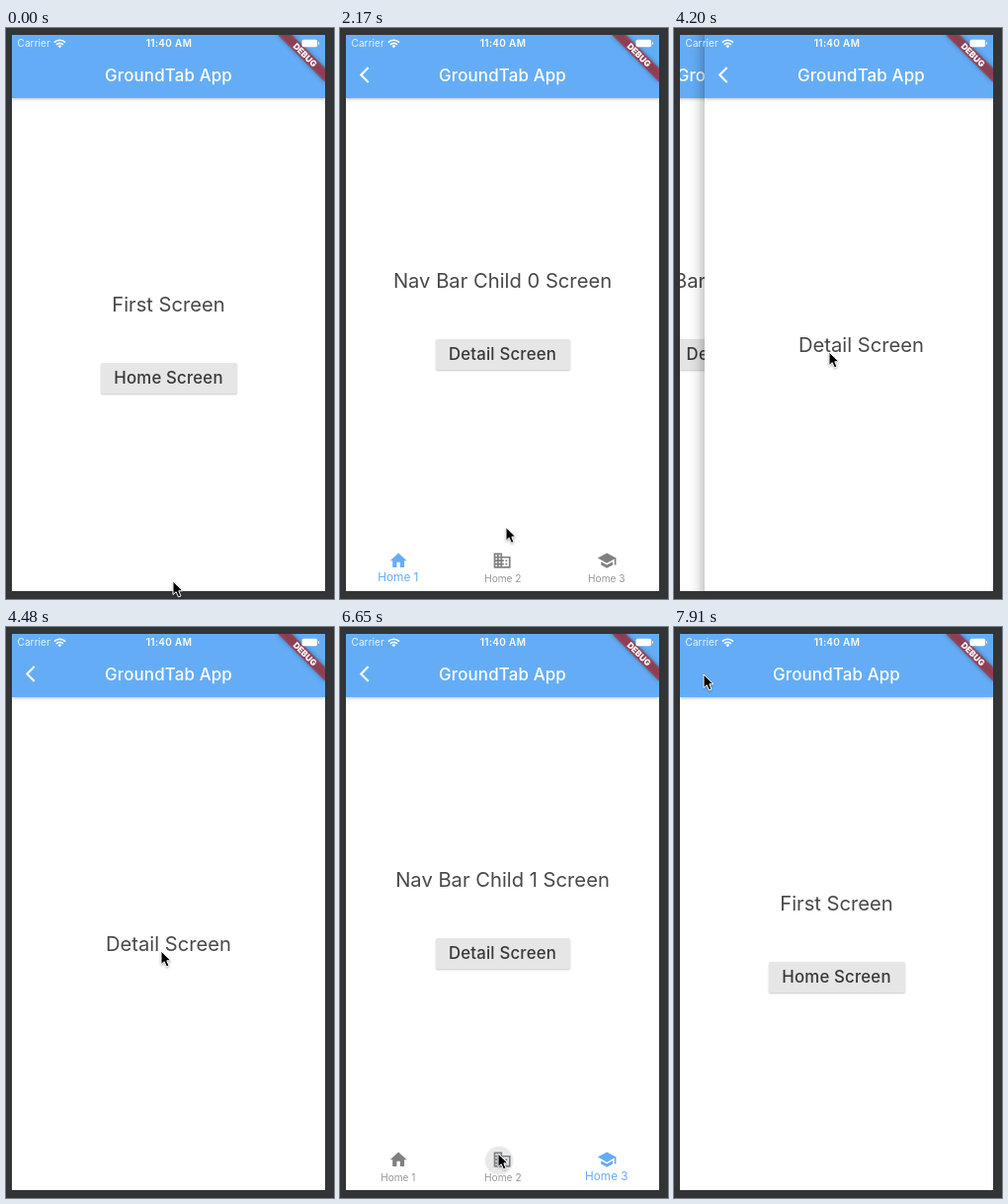
Recreate the animation shown at these times as an HTML page. Size 332 px wide and 578 px high, loop 8 s.

```html
<!DOCTYPE html>
<html lang="en">
<head>
<meta charset="utf-8">
<title>GroundTab App</title>
<style>
@property --on { syntax: "<number>"; inherits: true; initial-value: 0; }

html, body { margin: 0; width: 100%; height: 100%; overflow: hidden; background: #333435; }
body { position: relative; font-family: Inter, Roboto, sans-serif; }
.phone { position: absolute; left: 6px; top: 7px; width: 317px; height: 563px; overflow: hidden; background: #fff; }

/* Pages: 8 s loop, 1% = 80 ms */
.page { position: absolute; inset: 0; background: #fff; animation: 8s infinite cubic-bezier(.35, .91, .33, .97); }
.page::before { content: ""; position: absolute; left: -16px; width: 16px; top: 0; bottom: 0;
  background: linear-gradient(90deg, transparent, rgba(0, 0, 0, .05) 50%, rgba(0, 0, 0, .2)); }
.first { animation-name: first; }
.home { animation-name: home; }
.detail { animation-name: detail; }
@keyframes first {
  0%, 9.75% { transform: none; }
  14.875%, 92.875% { transform: translateX(-33.33%); }
  97.875%, 100% { transform: none; }
}
@keyframes home {
  0%, 9.75% { transform: translateX(100%); visibility: hidden; }
  14.875%, 50% { transform: translateX(0); visibility: visible; }
  55%, 63.625% { transform: translateX(-33.33%); visibility: visible; }
  68.625%, 92.875% { transform: translateX(0); visibility: visible; }
  97.875%, 100% { transform: translateX(100%); visibility: hidden; }
}
@keyframes detail {
  0%, 50% { transform: translateX(100%); visibility: hidden; }
  55%, 63.625% { transform: translateX(0); visibility: visible; }
  68.625%, 100% { transform: translateX(100%); visibility: hidden; }
}

.bar { position: absolute; left: 0; right: 0; top: 0; height: 64px; background: #64adf6; box-shadow: 0 1px 3px rgba(0, 0, 0, .25); }
.bar h1 { top: 30.5px; margin: 0; font-size: 16.9px; font-weight: 500; letter-spacing: .15px; color: #fff; }
.bar svg { position: absolute; left: 13px; top: 32px; }
.line { position: absolute; left: 0; right: 0; margin: 0; text-align: center; line-height: 20px; white-space: nowrap; }
.head { font-size: 20.2px; font-weight: 400; color: #484848; }
.btn { position: absolute; height: 31px; line-height: 30.5px; border-radius: 2px; text-align: center; white-space: nowrap;
  font-size: 16.8px; font-weight: 500; letter-spacing: .18px; color: #383838; background: #e6e6e6;
  box-shadow: 0 1px 2px rgba(0, 0, 0, .22); animation: 8s infinite ease-out; }
.first .btn { left: 89.5px; top: 332px; width: 138px; animation-name: press1; }
.home .btn { left: 90.5px; top: 308px; width: 136px; animation-name: press2; }
@keyframes press1 { 0%, 8.25% { background: #e6e6e6; } 9.75% { background: #d4d4d4; } 13%, 100% { background: #e6e6e6; } }
@keyframes press2 { 0%, 48.5% { background: #e6e6e6; } 50% { background: #d4d4d4; } 53.5%, 100% { background: #e6e6e6; } }

.child { top: 238.5px; animation: 8s infinite step-end; }
.c0 { animation-name: c0; }
.c1 { animation-name: c1; }
.c2 { animation-name: c2; }
@keyframes c0 { 0% { opacity: 1; } 30.625%, 100% { opacity: 0; } }
@keyframes c1 { 0% { opacity: 0; } 30.625% { opacity: 1; } 38.125% { opacity: 0; } 83%, 100% { opacity: 1; } }
@keyframes c2 { 0% { opacity: 0; } 38.125% { opacity: 1; } 83%, 100% { opacity: 0; } }

/* Tabs */
.nav { position: absolute; left: 0; right: 0; bottom: 0; height: 47px; overflow: hidden; }
.tab { position: absolute; top: 0; width: 33.333%; height: 100%; text-align: center;
  color: color-mix(in srgb, #64adf6 calc(var(--on) * 100%), #808080); animation: 8s infinite ease; }
.tab svg { position: absolute; left: calc(50% - 10.15px); top: 5.8px; width: 20.3px; height: 20.3px; fill: currentColor; }
.tab span { position: absolute; left: 0; right: 0; top: 26px; line-height: 14px; font-size: 11.8px;
  opacity: calc(.82 + .18 * var(--on));
  transform-origin: 50% 130%; transform: scale(calc(.857 + .143 * var(--on))); }
.t1 { left: 0; animation-name: t1; }
.t2 { left: 33.333%; animation-name: t2; }
.t3 { left: 66.667%; animation-name: t3; }
@keyframes t1 { 0%, 30.625% { --on: 1; } 33.125%, 100% { --on: 0; } }
@keyframes t2 { 0%, 30.625% { --on: 0; } 33.125%, 38.125% { --on: 1; } 40.625%, 83% { --on: 0; } 85.5%, 100% { --on: 1; } }
@keyframes t3 { 0%, 38.125% { --on: 0; } 40.625%, 83% { --on: 1; } 85.5%, 100% { --on: 0; } }

.ripple { position: absolute; left: var(--x); top: var(--y); width: 74px; height: 74px; margin: -37px; border-radius: 50%;
  background: #e9e9e9; animation: ripple 8s var(--at) infinite both linear; }
@keyframes ripple {
  0% { transform: scale(0); opacity: 1; }
  1.25% { transform: scale(.36); opacity: 1; }
  4.5%, 100% { transform: scale(1); opacity: 0; }
}

.over { position: absolute; left: 0; top: 0; fill: #fff; }
.ribbon { filter: drop-shadow(0 0 2.5px rgba(0, 0, 0, .5)); }

.cursor { position: absolute; left: .4px; top: .3px; overflow: visible; animation: cursor 8s infinite ease-in-out;
  filter: drop-shadow(0 1px 1px rgba(0, 0, 0, .3)); }
@keyframes cursor {
  0%, .5% { transform: translate(169px, 560px); }
  8%, 24% { transform: translate(163px, 353px); }
  24.1% { transform: translate(163px, 353px); animation-timing-function: ease-in; }
  27.125% { transform: translate(168px, 505px); animation-timing-function: ease-out; }
  29.2%, 32.5% { transform: translate(166px, 536px); }
  36.7% { transform: translate(268px, 550px); }
  39%, 42.5% { transform: translate(268px, 556px); }
  48%, 56% { transform: translate(157px, 328px); }
  62%, 71.5% { transform: translate(27px, 54px); }
  81%, 85.5% { transform: translate(160px, 533px); }
  91.8%, 100% { transform: translate(30px, 48px); }
}
</style>
</head>
<body>
<div class="phone">
  <section class="page first">
    <p class="line head" style="top:262.5px">First Screen</p>
    <div class="btn">Home Screen</div>
    <header class="bar"><h1 class="line">GroundTab App</h1></header>
  </section>

  <section class="page home">
    <p class="line head child c0">Nav Bar Child 0 Screen</p>
    <p class="line head child c1">Nav Bar Child 1 Screen</p>
    <p class="line head child c2">Nav Bar Child 2 Screen</p>
    <div class="btn">Detail Screen</div>
    <nav class="nav">
      <i class="ripple" style="--x:160px;--y:20px;--at:2.35s"></i>
      <i class="ripple" style="--x:263px;--y:30px;--at:2.95s"></i>
      <i class="ripple" style="--x:155px;--y:17px;--at:6.54s"></i>
      <div class="tab t1">
        <svg viewBox="0 0 24 24"><path d="M10 20v-6h4v6h5v-8h3L12 3 2 12h3v8z"/></svg>
        <span>Home 1</span>
      </div>
      <div class="tab t2">
        <svg viewBox="0 0 24 24"><path d="M12 7V3H2v18h20V7H12zM6 19H4v-2h2v2zm0-4H4v-2h2v2zm0-4H4V9h2v2zm0-4H4V5h2v2zm4 12H8v-2h2v2zm0-4H8v-2h2v2zm0-4H8V9h2v2zm0-4H8V5h2v2zm10 12h-8v-2h2v-2h-2v-2h2v-2h-2V9h8v10zm-2-8h-2v2h2v-2zm0 4h-2v2h2v-2z"/></svg>
        <span>Home 2</span>
      </div>
      <div class="tab t3">
        <svg viewBox="0 0 24 24"><path d="M5 13.2v4L12 21l7-3.8v-4L12 17zM12 3L1 9l11 6 9-4.9V17h2V9z"/></svg>
        <span>Home 3</span>
      </div>
    </nav>
    <header class="bar">
      <svg width="14" height="18" fill="none" stroke="#fff" stroke-width="2.1"><path d="M9.7 1L2.3 8.5l7.4 7.5"/></svg>
      <h1 class="line">GroundTab App</h1>
    </header>
  </section>

  <section class="page detail">
    <p class="line head" style="top:303.5px">Detail Screen</p>
    <header class="bar">
      <svg width="14" height="18" fill="none" stroke="#fff" stroke-width="2.1"><path d="M9.7 1L2.3 8.5l7.4 7.5"/></svg>
      <h1 class="line">GroundTab App</h1>
    </header>
  </section>

  <svg class="over" width="317" height="70" viewBox="6 7 317 70">
    <g transform="translate(323 7) rotate(45)">
      <rect class="ribbon" x="-33.8" y="23.7" width="67.6" height="10.1" fill="#b71c1c" fill-opacity=".63"/>
      <text y="31.9" text-anchor="middle" font-size="8.6" font-weight="900">DEBUG</text>
    </g>
    <text x="11.5" y="19.4" font-size="10" letter-spacing=".1" fill-opacity=".85">Carrier</text>
    <text x="165" y="19.4" font-size="10" font-weight="600" letter-spacing=".3" text-anchor="middle">11:40 AM</text>
    <g fill="none" stroke="#fff" stroke-width="1.7">
      <path d="M48.8 14.6a7.9 7.9 0 0 1 11.2 0M50.9 16.8a4.9 4.9 0 0 1 7 0"/>
    </g>
    <path d="M52.5 18.3a2.7 2.7 0 0 1 3.8 0l-1.9 1.9z"/>
    <rect x="299.5" y="11.8" width="15.6" height="7.4" rx="1.8"/>
    <path d="M316 14v3a1.7 1.7 0 0 0 0-3z"/>
  </svg>
</div>

<svg class="cursor" width="12" height="18">
  <path d="M0 0V13.6L3.2 10.7 5.5 16 8 15 5.8 9.8H10Z" fill="#000" stroke="#fff" stroke-width="1"/>
</svg>
</body>
</html>
```
